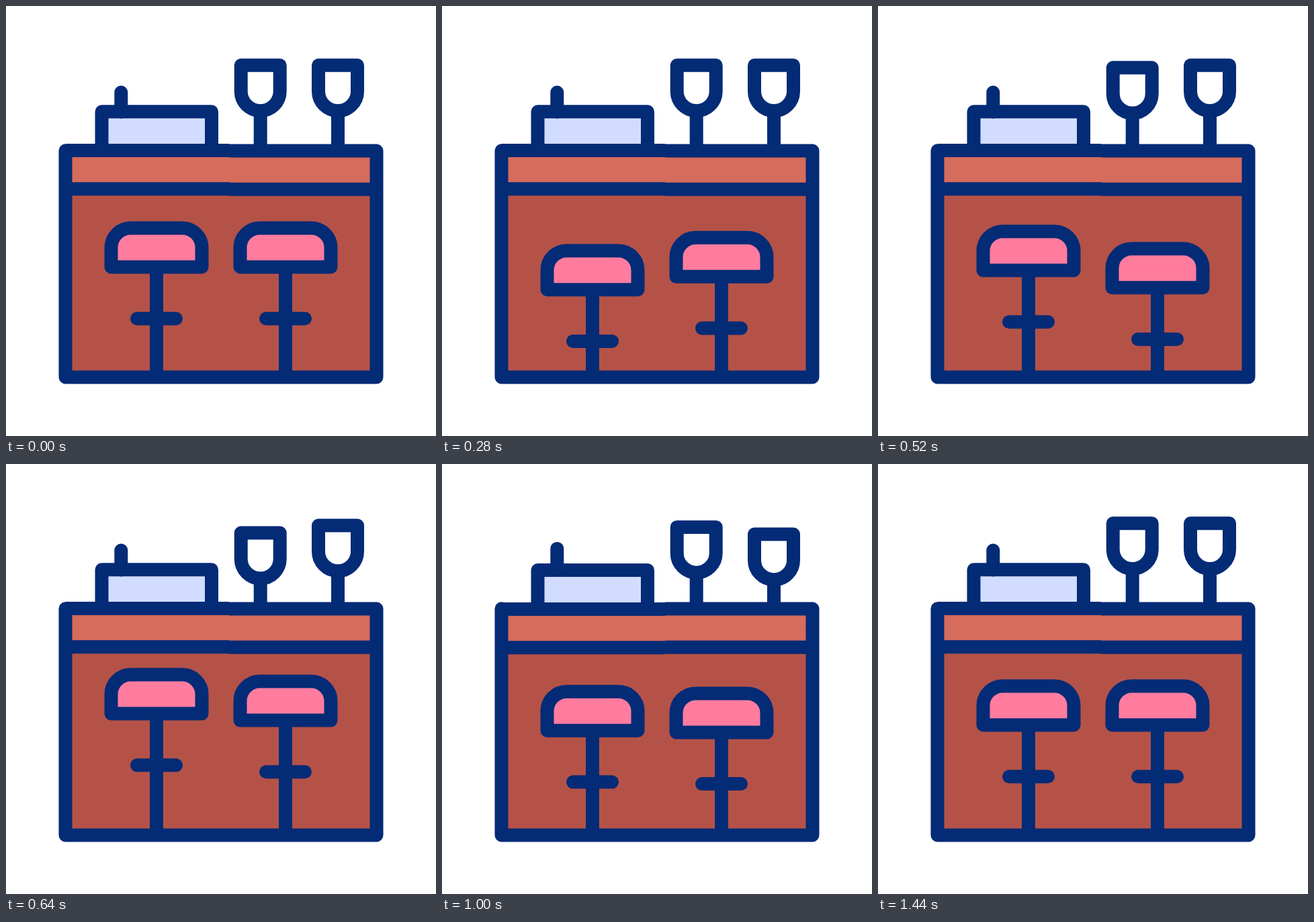
Animation of 640 by 640 pixels, one loop 1840 ms. Source, as an HTML page:

```html
<!DOCTYPE html>
<html lang="en">
<head>
<meta charset="utf-8">
<title>Bar counter</title>
<style>
  html, body { margin: 0; width: 100%; height: 100%; overflow: hidden; background: #fff; }
  svg { display: block; width: 100%; height: 100%; }
  .line { fill: none; stroke: #042b76; stroke-width: 20; stroke-linecap: round; stroke-linejoin: round; }
  .butt { stroke-linecap: butt; }
  .seat { fill: #ff7c9f; }
  .bowl { fill: #fff; }
  .ray { stroke: #ff6152; }
</style>
</head>
<body>
<svg viewBox="0 0 640 640">
  <defs>
    <g id="stool">
      <path class="line seat" d="M156.5 388.5V359.5a29 29 0 0 1 29-29H262.5a29 29 0 0 1 29 29V388.5Z"/>
      <path class="line" d="M195 465.2H253"/>
    </g>
    <path id="glass" class="line bowl" d="M349.7 88.3H407.7V127a29 29 0 0 1-58 0Z"/>
  </defs>

  <g id="rays"></g>

  <path class="line butt" id="glassStemA"/>
  <path class="line butt" id="glassStemB"/>
  <use href="#glass" id="glassA"/>
  <use href="#glass" id="glassB"/>

  <path fill="#d66c5c" d="M88.5 215.5H551.5V272.5H88.5Z"/>
  <path fill="#b45248" d="M88.5 272.5H551.5V552.5H88.5Z"/>

  <g id="till">
    <path class="line" style="fill:#d2dcff" d="M142.5 215V157.2H306V215"/>
    <path class="line butt" d="M88.5 215H332M88.5 272.3H332"/>
  </g>
  <path class="line" id="pin"/>
  <path class="line" d="M88.5 215.3V552.5H551.5V215.5"/>
  <path class="line butt" d="M332 215.5H551.5M332 272.8H551.5"/>

  <path class="line butt" id="stemA"/>
  <path class="line butt" id="stemB"/>
  <use href="#stool" id="stoolA"/>
  <use href="#stool" id="stoolB"/>
</svg>
<script>
const LOOP = 1840, STEP = 40;
const $ = id => document.getElementById(id);

// Tracks are [time, value] keys joined by an ease-in-out curve.
const bounce = [[100, 0], [360, 43.5], [630, -17], [905, 11], [1190, 0]];
const dipA = [[435, 0], [755, 20.3], [1130, 0]];
const dipB = [[560, 0], [880, 21], [1265, 0]];
const lift = [[950, 0], [1210, 27], [1440, 0]];
const settle = [[920, 0], [1000, 0.9], [1100, 0]];
const flash = [[1040, 0], [1200, 1], [1240, 1], [1420, 0]];
const STOOL_LAG = 80;

function at(keys, t) {
  if (t <= keys[0][0]) return keys[0][1];
  for (let i = 1; i < keys.length; i++) {
    const [t0, a] = keys[i - 1], [t1, b] = keys[i];
    if (t < t1) {
      const u = (t - t0) / (t1 - t0);
      return a + (b - a) * u * u * (3 - 2 * u);
    }
  }
  return keys[keys.length - 1][1];
}

// Each ray runs from its inner end to its outer end.
const rays = [[184.5, 118.8, 165.8, 96], [222, 105.5, 222, 83], [260, 118.8, 278.8, 96]].map(ends => {
  const el = document.createElementNS("http://www.w3.org/2000/svg", "path");
  el.setAttribute("class", "line ray");
  $("rays").append(el);
  return { el, ends };
});

const move = (id, x, y) => $(id).setAttribute("transform", `translate(${x} ${y})`);
const upright = (id, x, top, bottom) => $(id).setAttribute("d", `M${x} ${top}V${bottom}`);

function stool(name, dx, dy) {
  move("stool" + name, dx, dy);
  upright("stem" + name, 224 + dx, 390 + dy, 552);
}

function glass(name, dx, dy) {
  move("glass" + name, dx, dy);
  upright("glassStem" + name, 378.7 + dx, 156 + dy, 216);
}

function draw(t) {
  stool("A", 0, at(bounce, t));
  stool("B", 192, at(bounce, t - STOOL_LAG));
  glass("A", 0, at(dipA, t));
  glass("B", 115.3, at(dipB, t));
  move("till", 0, at(settle, t));
  upright("pin", 171.3, 128.5 - at(lift, t), 157.5);

  const grow = at(flash, t);
  $("rays").setAttribute("visibility", grow > 0 ? "visible" : "hidden");
  for (const { el, ends: [x0, y0, x1, y1] } of rays) {
    el.setAttribute("d", `M${x0} ${y0}L${x0 + (x1 - x0) * grow} ${y0 + (y1 - y0) * grow}`);
  }
}

const start = performance.now();
function tick() {
  const t = (performance.now() - start) % LOOP;
  draw(Math.floor(t / STEP) * STEP);
  requestAnimationFrame(tick);
}
tick();
</script>
</body>
</html>
```
